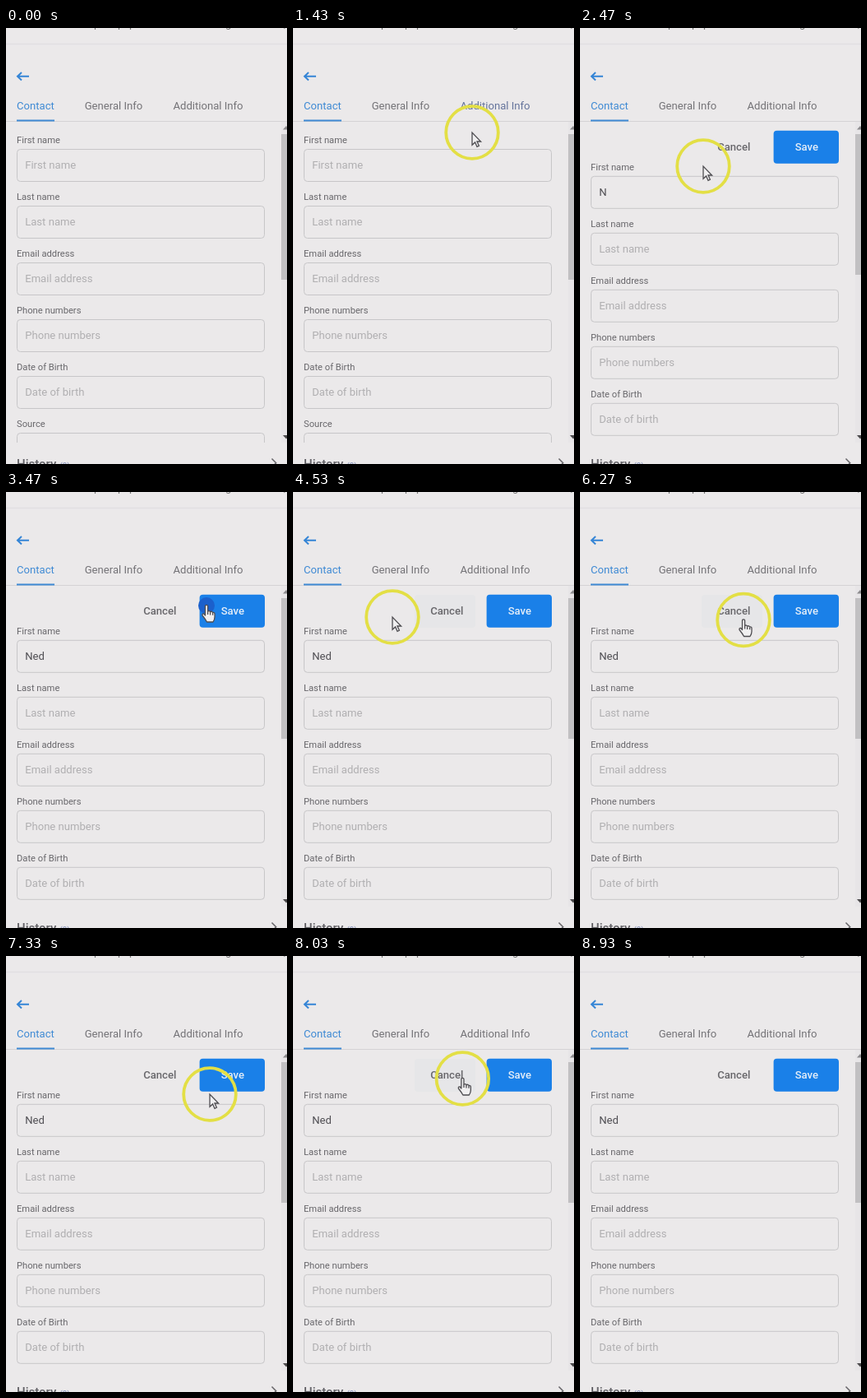
An HTML page for the animation above (8.96 s loop, 342 px wide and 530 px high).

```html
<!DOCTYPE html>
<html lang="en">
<head>
<meta charset="utf-8">
<title>Contact form</title>
<style>
html, body { margin: 0; width: 100%; height: 100%; overflow: hidden; background: #ebe9ea; }
svg { display: block; width: 342px; height: 530px; font: 13.1px Roboto, sans-serif; }
.tab { fill: #747377; }
.label { font-size: 11.2px; fill: #68676b; }
.box { fill: #ebe9ea; stroke: #c7c6c8; }
.hint { fill: #b0afb1; }
.btn { font-weight: 500; text-anchor: middle; }
</style>
</head>
<body>
<svg viewBox="0 0 342 530">
  <defs><clipPath id="view"><rect y="114" width="334" height="390"/></clipPath></defs>
  <rect width="342" height="530" fill="#ebe9ea"/>
  <text x="107 136 150 267 338" y="-.9" fill="#777">pppg,</text>
  <path d="M0 19.5H342" stroke="#e1dfe1" stroke-width="1.5"/>
  <path d="M28 58.7H14M19 54L14 58.7L19 63.4" fill="none" stroke="#3585d6" stroke-width="2"/>
  <text x="13" y="99.4" fill="#3f8ad4">Contact</text>
  <text class="tab" x="95.7" y="99.4">General Info</text>
  <text class="tab" id="extra" x="203.5" y="99.4">Additional Info</text>
  <path d="M0 113.5H342" stroke="#d5d3d5"/>
  <path d="M13 112.5H59" stroke="#3f8ad4" stroke-width="2"/>
  <g clip-path="url(#view)">
    <g id="form"></g>
    <g id="buttons">
      <rect id="cancel" x="148" y="125" width="74" height="40" rx="4" fill="#e6e6e8"/>
      <text class="btn" x="187.3" y="149" fill="#68676b">Cancel</text>
      <rect x="235.6" y="124.7" width="79.4" height="40" rx="4" fill="#1a80e8"/>
      <text class="btn" x="275.8" y="149" fill="#e4edf8">Save</text>
    </g>
  </g>
  <rect x="335" y="114" width="7" height="390" fill="#e7e5e7"/>
  <rect id="thumb" x="335" y="129" width="7" height="177" fill="#c1c0c2"/>
  <path d="M337 123.5L341 119L345 123.5Z" fill="#8c8b8d"/>
  <path d="M337 495L341 499.5L345 495Z" fill="#4b4a4c"/>
  <text x="13" y="535.2" font-size="15" font-weight="500" fill="#626166">History</text>
  <text x="65.5" y="534.5" font-size="9.5" font-weight="500" fill="#8d98bf">(0)</text>
  <path d="M323.5 523.5L328.7 528.7L323.5 534" fill="none" stroke="#666569" stroke-width="1.5"/>
  <g id="pointer">
    <circle id="ring"/>
    <path id="arrow" d="M0 0V15.2L3.6 11.9L6 17.4L8.4 16.3L6 11H10.6Z" fill="#f0eff0" stroke="#4e4d51" stroke-width="1.3"/>
    <g id="hand" fill="#f0eff0" stroke="#4e4d51" stroke-width="1.3" stroke-linejoin="round">
      <path d="M-1.5 12V1Q-1.5 -.7 0 -.7Q1.6 -.7 1.6 1V7Q3.5 5.8 4.6 7.6Q6.5 6.6 7.6 8.5Q10 8 10 10.3V14Q10 17 8 20H0.5Q-1 17 -5 12Q-5.4 9.6 -3.2 10Z"/>
      <path d="M1.6 7V11M4.6 8V11.4M7.6 9V11.7" fill="none"/>
    </g>
  </g>
</svg>
<script>
const $ = id => document.getElementById(id);
const LOOP = 8960, NAME = "Ned";
const typed = [2450, 2620, 2790];
const clicks = [[1960, 2120], [3360, 3580]];
// time, x, y of the pointer tip
const path = [
  [560, 380, 300], [1130, 260, 97], [1280, 243, 98], [1430, 218, 127],
  [1880, 150, 168], [2880, 150, 168], [3340, 244, 138], [3620, 244, 138],
  [4130, 190, 147], [4530, 121, 152], [4800, 124, 153], [5180, 240, 150],
  [5500, 268, 147], [5920, 200, 178], [6270, 199, 155.5], [6600, 186, 148],
  [6950, 198, 168], [7330, 248, 168], [7640, 262, 150], [8050, 206, 149],
  [8480, 380, 420]
];
const fields = [["First name"], ["Last name"], ["Email address"], ["Phone numbers"],
  ["Date of Birth", "Date of birth"], ["Source"]];

$("form").innerHTML = fields.map(([label, hint = label], i) => {
  const y = i * 69;
  return `<text class="label" x="13" y="${y + 140.4}">${label}</text>
    <rect class="box" x="13.5" y="${y + 147.5}" width="301" height="39" rx="4"/>
    <text class="hint" x="23.2" y="${y + 171.2}">${hint}</text>`;
}).join("");
const first = $("form").querySelector(".hint");

function place(t) {
  const i = path.findIndex(p => p[0] > t);
  if (i < 1) return null;
  const [t0, x0, y0] = path[i - 1], [t1, x1, y1] = path[i];
  const u = (t - t0) / (t1 - t0), e = u * u * (3 - 2 * u);
  return { x: x0 + (x1 - x0) * e, y: y0 + (y1 - y0) * e };
}
const inside = (p, x0, y0, x1, y1) => !!p && p.x >= x0 && p.x <= x1 && p.y >= y0 && p.y <= y1;
const onTab = p => inside(p, 198, 78, 294, 112);
const onCancel = p => inside(p, 148, 125, 222, 165);
const onSave = p => inside(p, 236, 125, 315, 165);
const show = (id, on) => $(id).setAttribute("visibility", on ? "visible" : "hidden");

function draw(t) {
  const count = typed.filter(k => k <= t).length, open = count > 0;
  const p = place(t);
  first.textContent = open ? NAME.slice(0, count) : "First name";
  first.style.fill = open ? "#4f4e53" : "";
  $("form").setAttribute("transform", `translate(0 ${open ? 32.8 : 0})`);
  $("thumb").setAttribute("height", open ? 171 : 177);
  $("buttons").style.display = open ? "" : "none";
  $("cancel").style.opacity = onCancel(p) || onCancel(place(t - 200)) ? 1 : 0;
  $("extra").style.fill = onTab(p) || onTab(place(t - 150)) ? "#64739b" : "";

  $("pointer").style.display = p ? "" : "none";
  if (!p) return;
  $("pointer").setAttribute("transform", `translate(${p.x} ${p.y})`);
  const hand = onTab(p) || open && (onCancel(p) || onSave(p));
  show("hand", hand);
  show("arrow", !hand);
  const down = clicks.some(([a, b]) => t >= a && t < b);
  const ring = $("ring");
  ring.setAttribute("r", down ? 10 : 31.8);
  ring.setAttribute("fill", down ? "#1b60cc" : "none");
  ring.setAttribute("stroke", down ? "none" : "#e3df45");
  ring.setAttribute("stroke-width", 3.8);
}

const start = performance.now();
function tick() {
  draw((performance.now() - start) % LOOP);
  requestAnimationFrame(tick);
}
tick();
</script>
</body>
</html>
```
